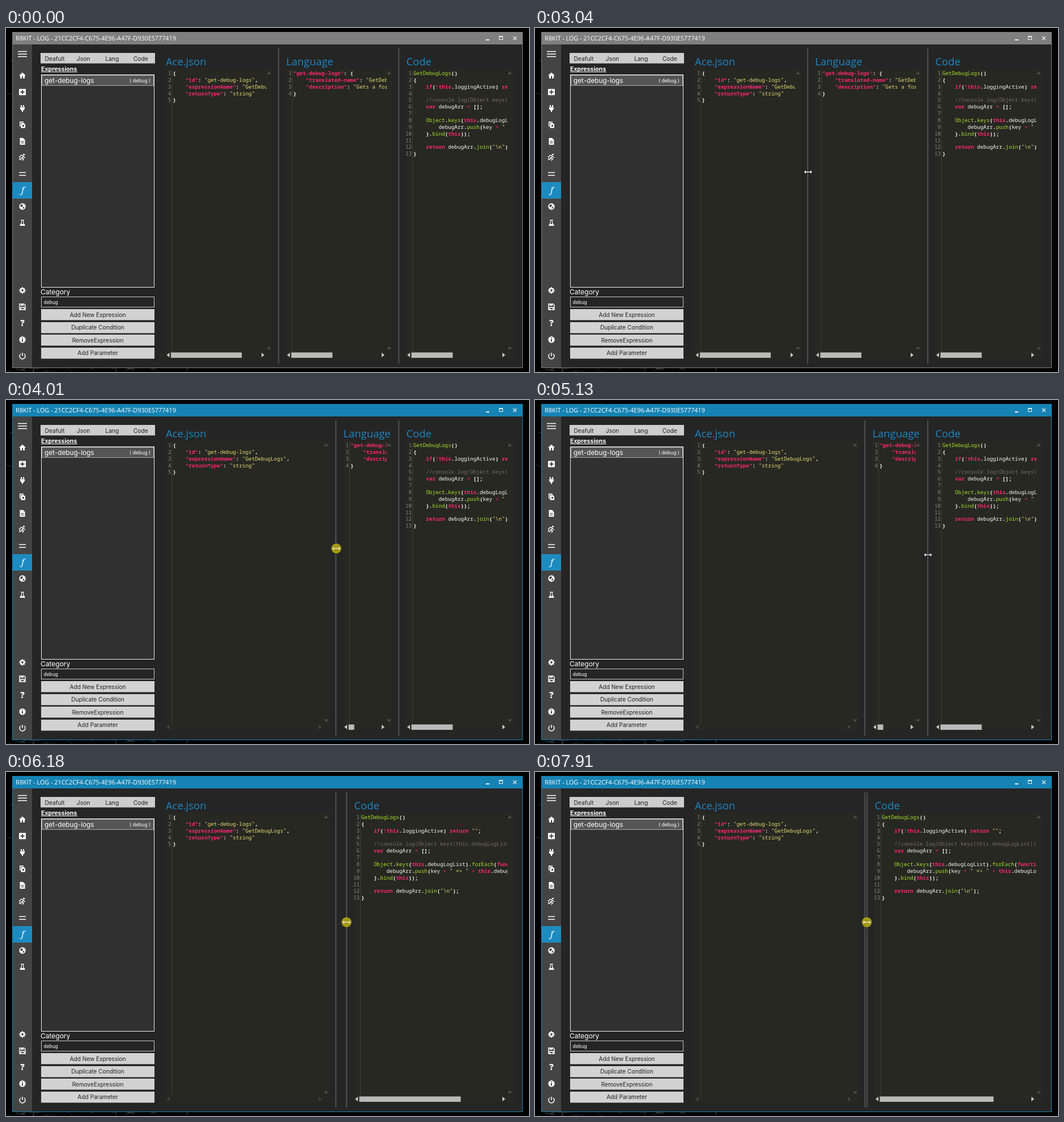
Write an HTML page with a canvas that moves like this. It is 923x607 px and loops after 8 s.

```html
<!DOCTYPE html>
<html lang="en">
<head>
<meta charset="utf-8">
<title>Resizable editor panels</title>
<style>
html, body { margin: 0; width: 100%; height: 100%; overflow: hidden; background: #000; }
canvas { display: block; }
</style>
</head>
<body>
<canvas id="stage" width="923" height="607"></canvas>
<script>
const ctx = document.getElementById('stage').getContext('2d');
const LOOP = 8000, CHAR = 5.568, LINE = 11.85;
const UI = '"Open Sans", sans-serif', GEO = 'Inter, sans-serif', MONO = '"Noto Sans Mono", monospace';

// pointer path: time, x, y
const path = [
  [1150, 700, 596], [1300, 680, 530], [1450, 460, 330], [1600, 211, 268], [1790, 359, 268],
  [1970, 359, 268], [2300, 400, 269], [2560, 470, 264], [2760, 482, 256], [2860, 482, 254],
  [3140, 482, 254], [3600, 540, 255], [3700, 540, 255], [4010, 583, 262], [4190, 583, 262],
  [4570, 693, 272], [4900, 693, 272], [5310, 694, 274], [5540, 693, 274], [5720, 649, 265],
  [6180, 601, 265], [6330, 593, 265], [6560, 593, 265], [6640, 589, 265], [7350, 589, 265],
  [7430, 586, 265], [8000, 585.5, 265]
];

const panels = [
  { title: 'Ace.json', extent: 209, code: `{
    "id": "get-debug-logs",
    "expressionName": "GetDebugLogs",
    "returnType": "string"
}` },
  { title: 'Language', extent: 358, code: `"get-debug-logs": {
    "translated-name": "GetDebugLogs",
    "description": "Gets a formatted list of all debug logs"
}` },
  { title: 'Code', extent: 361, code: String.raw`GetDebugLogs()
{
    if(!this.loggingActive) return "";

    //console.log(Object.keys(this.debugLogList));
    var debugArr = [];

    Object.keys(this.debugLogList).forEach(function(key){
        debugArr.push(key + " => " + this.debugLogList[key]);
    }.bind(this));

    return debugArr.join("\n");
}` }
];

// token groups: comment, key, string, keyword, operator, call, punctuation
const TOKEN = /(\/\/.*)|("[^"]*"(?=:))|("[^"]*")|\b(if|return|var|this|function)\b|([!+=]+)|(Object|\w+(?=\())|([()[\]{}.,;:]+)|\w+|\s+/g;
const STYLES = [['#75715e', 400], ['#f92672', 700], ['#e6db74', 400], ['#f92672', 700],
  ['#f92672', 400], ['#a6e22e', 400], ['#f8f8f2', 700]];
for (const p of panels) p.lines = p.code.split('\n').map(line =>
  [...line.matchAll(TOKEN)].map(m => {
    const group = m.slice(1).findIndex(Boolean);
    return { text: m[0], col: m.index, style: STYLES[group] || ['#f8f8f2', 400] };
  }));

const ring = r => `M${-r} 0A${r} ${r} 0 1 0 ${r} 0A${r} ${r} 0 1 0 ${-r} 0Z`;
// sidebar icons: y, filled path, stroked path
const icons = [
  [46, '', 'M-8-4.5H8M-8 0H8M-8 4.5H8'],
  [84, 'M-6 0L0-5.5 6 0H4V5H1V1H-1V5H-4V0Z'],
  [113, 'M-6-5.5H6V5.5H-6ZM-1-3.5V-1H-3.5V1H-1V3.5H1V1H3.5V-1H1V-3.5Z'],
  [142, 'M-4-2.5H4V1L1 4V6H-1V4L-4 1ZM-3-6H-1V-3H-3ZM1-6H3V-3H1Z'],
  [171, 'M-5-6H2V-4.5H-3.5V3H-5ZM-2.5-3.5H2L5-1V5.5H-2.5ZM0 0V3H3V0Z'],
  [200, 'M-4.5-6H1L4.5-2.5V6H-4.5ZM-2.5-.5V.7H2.5V-.5ZM-2.5 2.3V3.5H2.5V2.3Z'],
  [228, 'M1-6H4V-3.5H1Z', 'M-4-3H0L2-1L-1 1L2 3L0 6M-1 1L-3 4H-6M2-1L5 1M-6-1H-3M-6 1.5H-4'],
  [257, '', 'M-6-2H6M-6 3H6'],
  [315, ring(5.7) + 'M-3-3L0-4L1-1L-2 1L-4 0ZM1 1L4 0L2 4L0 3Z'],
  [344, 'M-3-5.5H3V-4.5H2V-1L5 5H-5L-2-1V-4.5H-3ZM-1-4V0L-2 2H2L1 0V-4Z'],
  [463, ring(4.5) + ring(1.9), 'M0-6V-4M0 6V4M-6 0H-4M6 0H4M-4-4L-3-3M4 4L3 3M-4 4L-3 3M4-4L3-3'],
  [492, 'M-3-5H2V-2H-3Z' + ring(0.5), 'M-5-5H3L5-3V5H-5ZM-3 5V1H3V5'],
  [550, ring(5.7) + 'M-1-3.5H1V-2H-1ZM-1-1H1V3.5H-1Z'],
  [579, '', 'M-3-4A5 5 0 1 0 3-4M0-6V0']
].map(([y, fill, stroke]) => [y, new Path2D(fill), new Path2D(stroke || '')]);

function rect(x, y, w, h, color) {
  ctx.fillStyle = color;
  ctx.fillRect(x, y, w, h);
}

function frame(x, y, w, h, color) {
  ctx.strokeStyle = color;
  ctx.lineWidth = 1;
  ctx.strokeRect(x + .5, y + .5, w - 1, h - 1);
}

function text(str, x, y, size, color, family, align = 'left', weight = 400) {
  ctx.font = `${weight} ${size}px ${family}`;
  ctx.textAlign = align;
  ctx.fillStyle = color;
  ctx.fillText(str, x, y);
}

function triangle(x, y, dx, dy, color) {
  ctx.fillStyle = color;
  ctx.beginPath();
  ctx.moveTo(x + dx * 2.5, y + dy * 2.5);
  ctx.lineTo(x - dx * 2.5 + dy * 4, y - dy * 2.5 + dx * 4);
  ctx.lineTo(x - dx * 2.5 - dy * 4, y - dy * 2.5 - dx * 4);
  ctx.fill();
}

function clipped(x, y, w, h, draw) {
  if (w <= 0) return;
  ctx.save();
  ctx.beginPath();
  ctx.rect(x, y, w, h);
  ctx.clip();
  draw();
  ctx.restore();
}

function pointer(t) {
  const i = path.findIndex(k => k[0] > t);
  if (i < 1) return path[i < 0 ? path.length - 1 : 0].slice(1);
  const [a, b] = [path[i - 1], path[i]];
  const f = (t - a[0]) / (b[0] - a[0]);
  return [a[1] + (b[1] - a[1]) * f, a[2] + (b[2] - a[2]) * f];
}

function drawWallpaper() {
  let seed = 11;
  const rnd = () => (seed = seed * 16807 % 2147483647) / 2147483647;
  rect(0, 0, 923, 607, '#030303');
  ctx.lineWidth = 1;
  for (let i = 0; i < 130; i++) {
    const low = i % 2, x = low ? rnd() * rnd() * 420 : rnd() * 923, y = low ? 600 + rnd() * 7 : rnd() * 607;
    ctx.strokeStyle = `rgba(200,200,200,${rnd() * rnd() * .5})`;
    ctx.beginPath();
    ctx.moveTo(x, y);
    ctx.lineTo(x + rnd() * 30 - 10, y + rnd() * 24 - 12);
    ctx.stroke();
  }
}

function drawWindow(active) {
  const accent = active ? '#1683b4' : '#7f7f7f';
  rect(11, 7, 901, 593, accent);
  rect(12, 29, 899, 570, '#252525');
  text('R8KIT - LOG - 21CC2CF4-C675-4E96-A47F-D930E5777419', 17, 22, 10.8, '#fff', UI);
  rect(847, 20, 6, 2, '#eee');
  frame(870, 14, 7, 7, '#eee');
  rect(870, 14, 7, 2, '#eee');
  ctx.lineWidth = 1.3;
  ctx.stroke(new Path2D('M895 15L901 21M901 15L895 21'));
}

function drawSidebar() {
  rect(12, 29, 34, 570, '#444');
  rect(11, 272, 35, 29, '#1e8bc0');
  ctx.strokeStyle = '#fff';
  ctx.lineWidth = 1.5;
  for (const [y, fill, stroke] of icons) {
    ctx.save();
    ctx.translate(29, y);
    ctx.fillStyle = '#fff';
    ctx.fill(fill, 'evenodd');
    ctx.stroke(stroke);
    ctx.restore();
  }
  text('ƒ', 29, 291, 15, '#fff', '"Noto Serif", serif', 'center', 'italic 400');
  text('?', 29, 526, 15, '#fff', UI, 'center', 800);
}

function drawList() {
  rect(61, 44, 202, 18.5, '#cdcdcd');
  ['Deafult', 'Json', 'Lang', 'Code'].forEach((s, i) =>
    text(s, 86 + i * 50.6, 57.5, 10.3, '#222', GEO, 'center'));
  text('Expressions', 62, 76, 10.6, '#fff', GEO, 'left', 700);
  rect(62, 77, 64, 1, '#fff');
  rect(62, 82, 200, 375.5, '#303030');
  rect(63, 83, 198, 19, '#555');
  frame(63, 83, 198, 19, '#aaa');
  frame(62, 82, 200, 376, '#eee');
  text('get-debug-logs', 68, 97, 11.8, '#fff', GEO);
  text('( debug )', 255, 96, 8.6, '#fff', GEO, 'right');
  text('Category', 61, 470, 12, '#fff', GEO);
  frame(62, 474, 200, 19, '#ccc');
  text('debug', 66.5, 486.5, 8.4, '#fff', GEO);
  ['Add New Expression', 'Duplicate Condition', 'RemoveExpression', 'Add Parameter'].forEach((s, i) => {
    const y = 496 + i * 22.6;
    rect(62, Math.round(y), 200, 19.5, '#d2d2d2');
    text(s, 162, y + 13.6, 10.1, '#222', GEO, 'center');
  });
}

function drawPanel(p, left, right) {
  const x0 = left + 26, clipX = right - 21, dim = '#44443f';
  clipped(left + 10, 36, right - 13 - left - 10, 40, () =>
    text(p.title, left + 13.5, 66, 18.4, '#1e87c3', UI));
  clipped(left + 11, 73, right - 11 - left - 11, 512, () => {
    rect(left + 13, 73, right - left - 24, 510, '#272822');
    rect(left + 24, 73, 1, 498, '#3d3e39');
    p.lines.forEach((_, i) =>
      text(i + 1, left + 23, 83 + i * LINE, 9.28, '#85867f', MONO, 'right'));
    clipped(x0, 73, clipX - x0, 498, () => p.lines.forEach((line, i) => {
      for (const { text: s, col, style } of line)
        text(s, x0 + col * CHAR, 83 + i * LINE, 9.28, style[0], MONO, 'left', style[1]);
    }));
    triangle(right - 17, 79, 0, -1, '#4c4c47');
    triangle(right - 17, 566, 0, 1, '#4c4c47');
    const view = clipX - x0, track = right - 32 - (left + 22.5), scrolls = view < p.extent;
    triangle(left + 17.5, 577, -1, 0, scrolls ? '#c8c8c8' : dim);
    triangle(right - 27.5, 577, 1, 0, scrolls ? '#c8c8c8' : dim);
    if (scrolls && track > 5) rect(left + 22.5, 572.5, Math.max(5, track * view / p.extent), 9.5, '#b9b9b9');
  });
}

function drawPointer(x, y, splits, pressed) {
  if (pressed) {
    ctx.fillStyle = '#a39a14';
    ctx.beginPath();
    ctx.arc(x, y, 8.8, 0, 7);
    ctx.fill();
  }
  const gap = Math.min(...splits.map(s => Math.abs(s - x)));
  ctx.save();
  ctx.translate(x, y);
  let shape = 'M-2-6H2V-5H.5V5H2V6H-2V5H-.5V-5H-2Z';
  if (pressed || gap < 5) shape = 'M-7 0L-4-3V-.7H4V-3L7 0L4 3V.7H-4V3Z';
  else if (x < 282 || y > 583 || gap < 12) shape = 'M0 0V12L3 9.5L5 14L6.7 13L5 9H8.5Z';
  const p = new Path2D(shape);
  ctx.strokeStyle = pressed ? '#6d6710' : '#111';
  ctx.lineWidth = 1;
  ctx.stroke(p);
  ctx.fillStyle = pressed ? '#f8f5c0' : '#fff';
  ctx.fill(p);
  ctx.restore();
}

function render(t) {
  const pressed = (t >= 3140 && t < 4190) || t >= 5260;
  const splits = [
    Math.round(pointer(Math.min(Math.max(t, 3140), 4010))[0]) - 1,
    Math.round(pointer(Math.max(t, 5540))[0])
  ];
  const edges = [268.5, ...splits, 906];
  drawWallpaper();
  drawWindow(t >= 3140);
  drawSidebar();
  drawList();
  panels.forEach((p, i) => drawPanel(p, edges[i], edges[i + 1]));
  for (const s of splits) rect(s - 1, 36, 2.3, 556, '#4a4b4c');
  if (t >= 1150) drawPointer(...pointer(t), splits, pressed);
}

function tick(now) {
  render(now % LOOP);
  requestAnimationFrame(tick);
}
requestAnimationFrame(tick);
</script>
</body>
</html>
```
